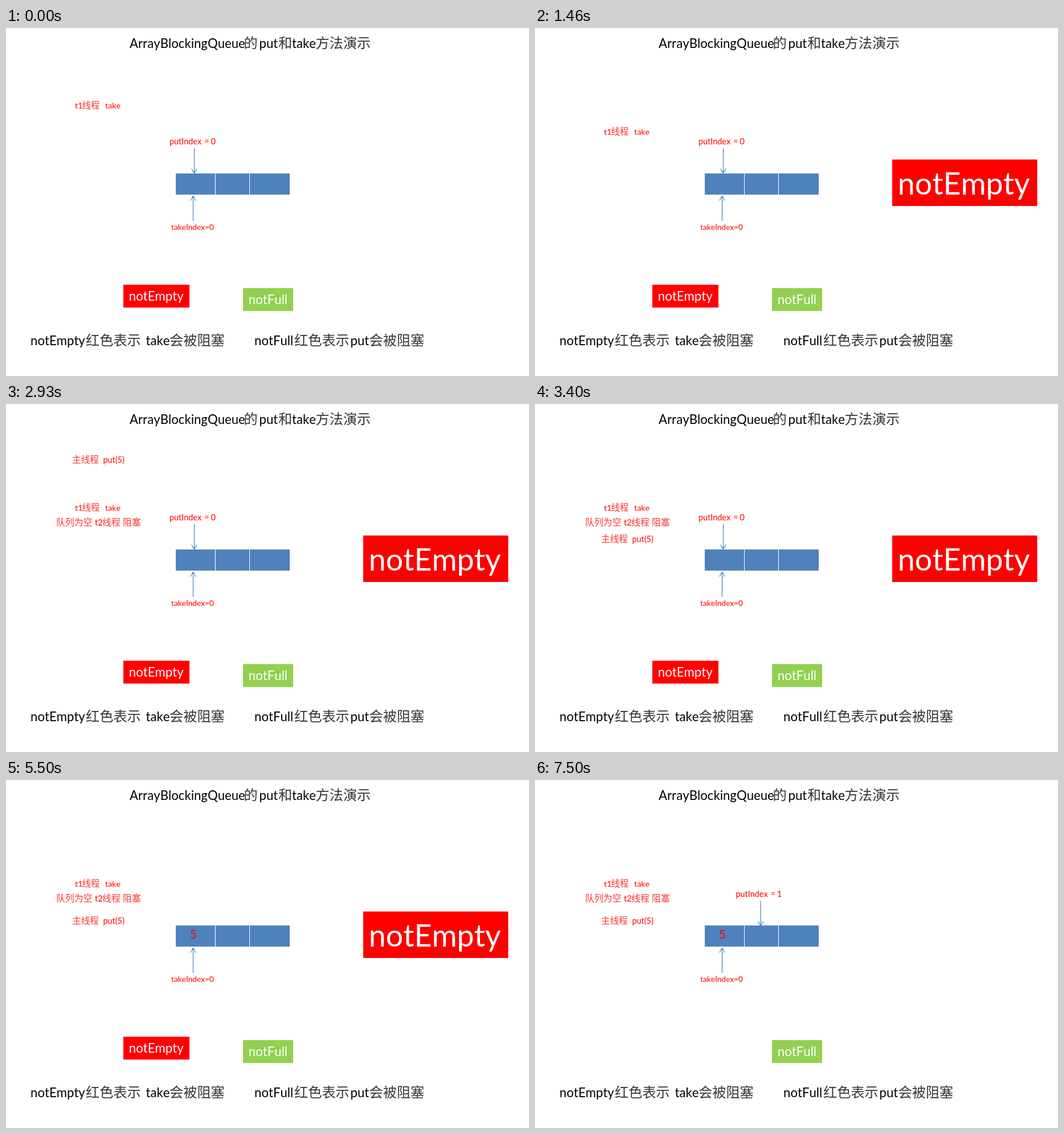
Recreate the animation shown at these times as an HTML page. Size 918 by 610 pixels, loop 8000 ms.

```html
<!DOCTYPE html>
<html lang="zh">
<head>
<meta charset="utf-8">
<title>ArrayBlockingQueue</title>
<style>
html, body { margin: 0; width: 100%; height: 100%; overflow: hidden; background: #fff; }
svg { display: block; }
text { font-family: Lato, sans-serif; font-kerning: none; white-space: pre; }
.cjk { font-family: "Noto Sans CJK SC", "Noto Sans CJK", sans-serif; font-weight: 300; fill-opacity: .8; }
path { fill: none; stroke: #4a7ebb; stroke-width: 1.2; }
</style>
</head>
<body>
<svg id="stage" width="918" height="610" viewBox="0 0 918 610"></svg>
<script>
const LOOP = 8000, RED = '#f00', BLUE = '#4f81bd';
const stage = document.getElementById('stage');

function add(parent, tag, attrs = {}) {
  const el = document.createElementNS('http://www.w3.org/2000/svg', tag);
  for (const key in attrs) el.setAttribute(key, attrs[key]);
  parent.appendChild(el);
  return el;
}
const group = () => add(stage, 'g');
const rect = (parent, x, y, width, height, fill) => add(parent, 'rect', { x, y, width, height, fill });

// runs: x, string, x, string, ...
function write(parent, y, size, fill, ...runs) {
  for (let i = 0; i < runs.length; i += 2) {
    const cjk = /[\u4e00-\u9fff]/.test(runs[i + 1]);
    const el = add(parent, 'text', { x: runs[i], y, fill, 'font-size': cjk ? size * 1.09 : size });
    if (cjk) el.setAttribute('class', 'cjk');
    el.textContent = runs[i + 1];
  }
  return parent;
}

function label(x, y, w, h, fill, textX, baseline, size, string) {
  const g = group();
  rect(g, x, y, w, h, fill);
  return write(g, baseline, size, '#fff', textX, string);
}

function arrow(parent, x, from, to) {
  const back = to - Math.sign(to - from) * 8;
  add(parent, 'path', { d: `M${x} ${from}V${to}M${x - 4.7} ${back}L${x} ${to}L${x + 4.7} ${back}` });
}

function putIndex(x, y, value) {
  const g = group();
  write(g, y, 14.4, RED, x, 'putIndex', x + 61, '=', x + 72.5, value);
  arrow(g, x + 43.5, y + 7, y + 51);
  return g;
}

write(stage, 35, 22.2, '#000', 217, 'ArrayBlockingQueue', 417.5, '的', 444.5, 'put', 478, '和', 502, 'take', 543.5, '方法演示');
write(stage, 556, 22.2, '#000', 43, 'notEmpty', 140, '红色表示', 245.5, 'take', 287, '会被阻塞',
  436, 'notFull', 506, '红色表示', 604.5, 'put', 637.5, '会被阻塞');

rect(stage, 298, 255, 200, 37, BLUE);
for (const x of [367, 427]) rect(stage, x, 255, 1, 37, '#fff');
write(stage, 353.5, 13.7, RED, 290, 'takeIndex=0');
arrow(stage, 328.5, 338, 294.5);

label(416, 456, 88, 40, '#92d050', 425.8, 483.5, 22.2, 'notFull');
const smallEmpty = label(206, 450, 116, 40, RED, 215.8, 477.5, 22.2, 'notEmpty');
const bigEmpty = label(627, 230.5, 254.5, 81.5, RED, 636.8, 292, 53.7, 'notEmpty');
const putZero = putIndex(287, 203.5, '0');

const take = write(group(), 187, 14.3, RED, 121, 't1', 133.5, '线程', 174, 'take');
const blocked = write(group(), 212.5, 14.6, RED, 88, '队列为空', 156, 't2', 169, '线程', 205, '阻塞');
const put = write(group(), 252, 14.4, RED, 116, '主线程', 170.5, 'put(5)');
const five = write(group(), 278, 21.4, RED, 322.5, '5');
const putOne = putIndex(352.5, 204.8, '1');

// Stepped fall from above: constant stride, shorter last step.
const falls = [
  { el: take, start: 0, end: 450, steps: 6, stride: 7.6, last: 7.6 },
  { el: blocked, start: 1630, end: 2480, steps: 11, stride: 19.7, last: 4.5 },
  { el: put, start: 2630, end: 3480, steps: 11, stride: 23.2, last: 10 },
  { el: five, start: 3630, end: 4490, steps: 11, stride: 25.2, last: 20 },
  { el: putOne, start: 5650, end: 6510, steps: 11, stride: 23.6, last: 17 },
];

const show = (el, on) => el.setAttribute('visibility', on ? 'visible' : 'hidden');

function draw(t) {
  show(bigEmpty, t >= 1460 && t < 7040);
  show(smallEmpty, t < 7500);
  show(putZero, t < 5500);
  for (const { el, start, end, steps, stride, last } of falls) {
    const step = Math.floor((t - start + 10) / ((end - start) / steps));
    const rise = step >= steps ? 0 : last + stride * (steps - 1 - step);
    show(el, t >= start);
    el.setAttribute('transform', `translate(0 ${-rise})`);
  }
}

const begin = performance.now();
function tick() {
  draw((performance.now() - begin) % LOOP);
  requestAnimationFrame(tick);
}
tick();
</script>
</body>
</html>
```
